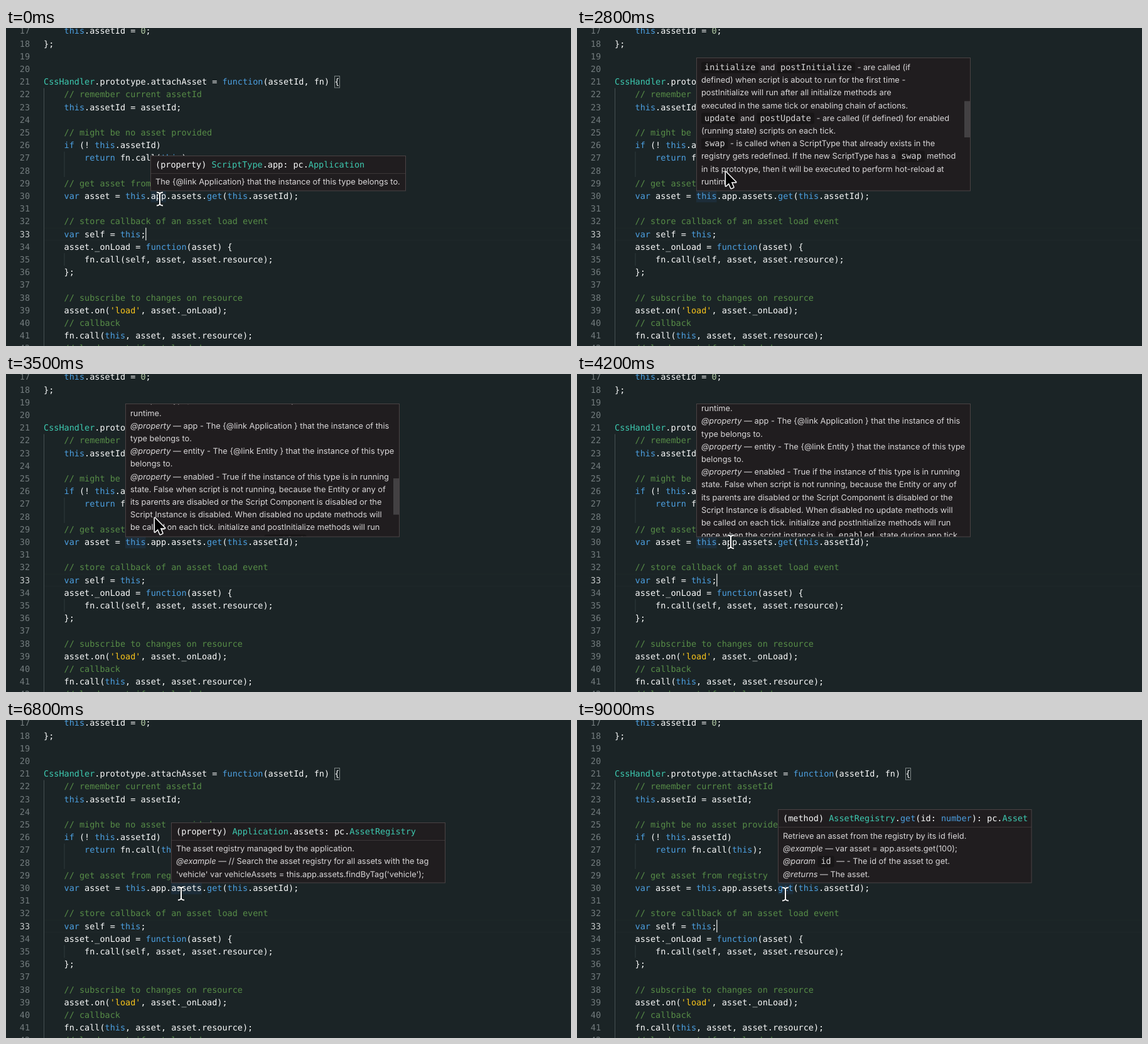
Write an HTML page with a canvas that moves like this. It is 900 px wide and 506 px high and loops after 9.1 s.

```html
<!DOCTYPE html>
<html lang="en">
<head>
<meta charset="utf-8">
<title>Code hover hints</title>
<style>
html, body { margin: 0; width: 100%; height: 100%; overflow: hidden; background: #1b2426; }
canvas { display: block; width: 900px; height: 506px; }
</style>
</head>
<body>
<canvas id="stage" width="900" height="506"></canvas>
<script>
const ctx = document.getElementById('stage').getContext('2d');
const LOOP = 9100, STEP = 100;
const CHAR = 8.125, ROW = 20.2, LEFT = 60;
const MONO = '13.5px "DejaVu Sans Mono", monospace';
const SANS = '12.82px Inter, sans-serif';
const COLORS = {
  plain: '#fafbfb', comment: '#578c47', string: '#f8c41c', keyword: '#4c9fe0',
  type: '#3dc9b0', number: '#b5cea8', prose: '#d9d7d8'
};

const FIRST_LINE = 17;
const CODE = [
  '    this.assetId = 0;',
  '};',
  '',
  '',
  'CssHandler.prototype.attachAsset = function(assetId, fn) {',
  '    // remember current assetId',
  '    this.assetId = assetId;',
  '',
  '    // might be no asset provided',
  '    if (! this.assetId)',
  '        return fn.call(this);',
  '',
  '    // get asset from registry',
  '    var asset = this.app.assets.get(this.assetId);',
  '',
  '    // store callback of an asset load event',
  '    var self = this;',
  '    asset._onLoad = function(asset) {',
  '        fn.call(self, asset, asset.resource);',
  '    };',
  '',
  '    // subscribe to changes on resource',
  "    asset.on('load', asset._onLoad);",
  '    // callback',
  '    fn.call(this, asset, asset.resource);',
  '    // load asset if not loaded'
];

// Prose markup: `inline code` and *italic*.
const HINTS = {
  app: {
    x: 230.5, y: 203.5, w: 406, word: [21, 3],
    head: '(property) ScriptType.app: pc.Application',
    blocks: [{ y: 245.3, lines: ['The {@link Application} that the instance of this type belongs to.'] }]
  },
  self: {
    x: 190.5, y: 47.5, w: 436, word: [16, 4],
    head: 'this: pc.ScriptType',
    blocks: [
      { y: 90, lines: [
        'Represents the type of a script. It is returned by {@link createScript}.',
        'Also referred to as Script Type.',
        'The type is to be extended using its JavaScript prototype. There is a',
        'list of methods that will be executed by the engine on instances of',
        'this type, such as:'
      ] },
      { y: 197.5, bullets: true, lines: ['`initialize`', '`postInitialize`', '`update`', '`postUpdate`', '`swap`'] },
      { y: 315.2, lines: [
        '`initialize` and `postInitialize` - are called (if',
        'defined) when script is about to run for the first time -',
        'postInitialize will run after all initialize methods are',
        'executed in the same tick or enabling chain of actions.',
        '`update` and `postUpdate` - are called (if defined) for enabled',
        '(running state) scripts on each tick.',
        '`swap` - is called when a ScriptType that already exists in the',
        'registry gets redefined. If the new ScriptType has a `swap` method',
        'in its prototype, then it will be executed to perform hot-reload at',
        'runtime.',
        '*@property* — app - The {@link Application } that the instance of this',
        'type belongs to.',
        '*@property* — entity - The {@link Entity } that the instance of this type',
        'belongs to.',
        '*@property* — enabled - True if the instance of this type is in running',
        'state. False when script is not running, because the Entity or any of',
        'its parents are disabled or the Script Component is disabled or the',
        'Script Instance is disabled. When disabled no update methods will',
        'be called on each tick. initialize and postInitialize methods will run',
        'once when the script instance is in `enabled` state during app tick.'
      ] }
    ]
  },
  assets: {
    x: 263.5, y: 163.5, w: 436, word: [25, 6],
    head: '(property) Application.assets: pc.AssetRegistry',
    blocks: [{ y: 205, lines: [
      'The asset registry managed by the application.',
      '*@example* — // Search the asset registry for all assets with the tag',
      "'vehicle' var vehicleAssets = this.app.assets.findByTag('vehicle');"
    ] }]
  },
  get: {
    x: 320.5, y: 142.5, w: 403.5, word: [32, 3],
    head: '(method) AssetRegistry.get(id: number): pc.Asset',
    blocks: [{ y: 184.8, lines: [
      'Retrieve an asset from the registry by its id field.',
      '*@example* — var asset = app.assets.get(100);',
      '*@param* `id` — - The id of the asset to get.',
      '*@returns* — The asset.'
    ] }]
  }
};
const HINT_BOTTOM = 259, CONTENT_HEIGHT = 775;

// [start, hint]
const SCHEDULE = [
  [0, 'app'], [500, null], [1100, 'self'], [4400, 'app'],
  [5700, null], [6100, 'assets'], [7400, null], [7900, 'get']
];
// [time, x, y]
const POINTER = [
  [0, 245, 272], [100, 245, 272], [900, 207, 279], [1800, 207, 279], [2300, 237, 229],
  [3500, 237, 229], [4100, 245, 267], [4700, 245, 267], [5600, 269, 276.5],
  [6000, 279, 276], [7000, 279, 276], [7700, 332, 277]
];
// [time, offset]
const SCROLL = [[2300, 0], [3100, 369], [3600, 442]];

function track(keys, t) {
  const next = keys.findIndex(k => k[0] > t);
  if (next < 0) return keys[keys.length - 1].slice(1);
  if (next === 0) return keys[0].slice(1);
  const a = keys[next - 1], b = keys[next];
  const p = (t - a[0]) / (b[0] - a[0]), e = p * p * (3 - 2 * p);
  return a.slice(1).map((v, i) => v + (b[i + 1] - v) * e);
}

const rowTop = line => 75.4 + (line - 21) * ROW;
const baseline = line => rowTop(line) + 14.7;
const colX = col => LEFT + col * CHAR;

function rect(x, y, w, h, color) {
  ctx.fillStyle = color;
  ctx.fillRect(x, y, w, h);
}

function text(str, x, y, font, color) {
  ctx.font = font;
  ctx.fillStyle = color;
  ctx.fillText(str, x, y);
}

const TOKENS = /(?<comment>\/\/.*)|(?<string>'[^']*')|(?<keyword>\b(?:this|var|function|return|if|get|number)\b)|(?<type>\b(?:CssHandler|ScriptType|Application|AssetRegistry|Asset)\b)|(?<number>\b\d+)|(?<plain>[\w.]+?(?=\b|\.)|\S)/g;

function code(str, x, y) {
  for (const m of str.matchAll(TOKENS)) {
    const kind = Object.keys(m.groups).find(k => m.groups[k] !== undefined);
    text(m[0], x + m.index * CHAR, y, MONO, COLORS[kind]);
  }
}

function prose(str, x, mid) {
  const base = mid + 4.1;
  for (const part of str.split(/(`[^`]+`|\*[^*]+\*)/).filter(Boolean)) {
    const body = part.slice(1, -1);
    if (part[0] === '`') {
      const w = body.length * CHAR + 10;
      ctx.beginPath();
      ctx.roundRect(x, mid - 9, w, 18, 3);
      ctx.fillStyle = '#181617';
      ctx.fill();
      text(body, x + 5, base, MONO, COLORS.prose);
      x += w;
    } else {
      const italic = part[0] === '*';
      const run = italic ? body : part;
      text(run, x, base, (italic ? 'italic ' : '') + SANS, COLORS.prose);
      x += ctx.measureText(run).width;
    }
  }
}

function drawEditor(t, hint) {
  rect(0, 0, 900, 506, '#1b2426');
  rect(LEFT, rowTop(33), 840, 1, '#1f282a');
  rect(LEFT, rowTop(34) - 1, 840, 1, '#1f282a');
  rect(LEFT, rowTop(22), 1, 506, '#465052');
  rect(92.5, rowTop(27), 1, ROW * 2, '#303a3c');
  rect(92.5, rowTop(35), 1, ROW, '#303a3c');

  if (hint) rect(colX(hint.word[0]), rowTop(30), hint.word[1] * CHAR, ROW, '#1d2d39');

  ctx.strokeStyle = '#7d8585';
  ctx.lineWidth = 1;
  ctx.strokeRect(523.5, 76.5, 8, 18.5);

  CODE.forEach((src, i) => {
    const line = FIRST_LINE + i, y = baseline(line);
    text(String(line), 38 - 2 * CHAR, y, MONO, line === 33 ? '#c8cccc' : '#737c7e');
    code(src, LEFT, y);
  });

  if (t % 1000 < 500) rect(222, rowTop(33), 1.6, ROW, '#b8bbba');
}

function drawHint(hint, scroll, hovered) {
  const { x, y, w } = hint, h = HINT_BOTTOM - y;
  rect(x, y, w, h, '#201d1f');
  ctx.save();
  ctx.beginPath();
  ctx.rect(x, y, w, h);
  ctx.clip();
  ctx.translate(0, -scroll);
  code(hint.head, x + 7.5, y + 18);
  rect(x, y + 27.5, w, 1, '#3b3637');
  for (const block of hint.blocks) {
    block.lines.forEach((line, i) => {
      const mid = block.y + i * ROW;
      if (block.bullets) {
        ctx.beginPath();
        ctx.arc(x + 12, mid + 0.5, 2, 0, 7);
        ctx.fillStyle = COLORS.prose;
        ctx.fill();
      }
      prose(line, x + (block.bullets ? 24 : 7.5), mid);
    });
  }
  ctx.restore();
  if (hovered) {
    rect(x + w - 9.5, y + scroll * h / CONTENT_HEIGHT, 9.5, h * h / CONTENT_HEIGHT, 'rgba(121,121,121,.4)');
  }
  ctx.strokeStyle = '#4a4344';
  ctx.lineWidth = 1;
  ctx.strokeRect(x, y, w, h);
}

const ARROW = new Path2D('M0 0V22.3L5 17.7L8.5 26L12.2 24.4L8.8 16.2H16Z');
const BEAM = new Path2D('M-5-10.5Q-1-10.5 0-8Q1-10.5 5-10.5M0-8V8M-5 10.5Q-1 10.5 0 8Q1 10.5 5 10.5');

function drawPointer(x, y, arrow) {
  const stroke = (path, color, width) => {
    ctx.strokeStyle = color;
    ctx.lineWidth = width;
    ctx.stroke(path);
  };
  ctx.save();
  ctx.translate(x, y);
  ctx.lineJoin = 'round';
  if (arrow) {
    stroke(ARROW, '#fff', 3);
    ctx.fillStyle = '#000';
    ctx.fill(ARROW);
  } else {
    stroke(BEAM, '#12181a', 4);
    stroke(BEAM, '#fff', 2);
  }
  ctx.restore();
}

function draw(t) {
  const name = SCHEDULE.filter(s => s[0] <= t).pop()[1];
  const hint = HINTS[name];
  const [px, py] = track(POINTER, t);
  const inside = Boolean(hint) && py < HINT_BOTTOM;
  ctx.textRendering = 'geometricPrecision';
  drawEditor(t, hint);
  if (hint) drawHint(hint, name === 'self' ? track(SCROLL, t)[0] : 0, inside);
  drawPointer(px, py, inside);
}

const start = performance.now();
function tick() {
  const t = (performance.now() - start) % LOOP;
  draw(Math.floor(t / STEP) * STEP);
  requestAnimationFrame(tick);
}
tick();
</script>
</body>
</html>
```
